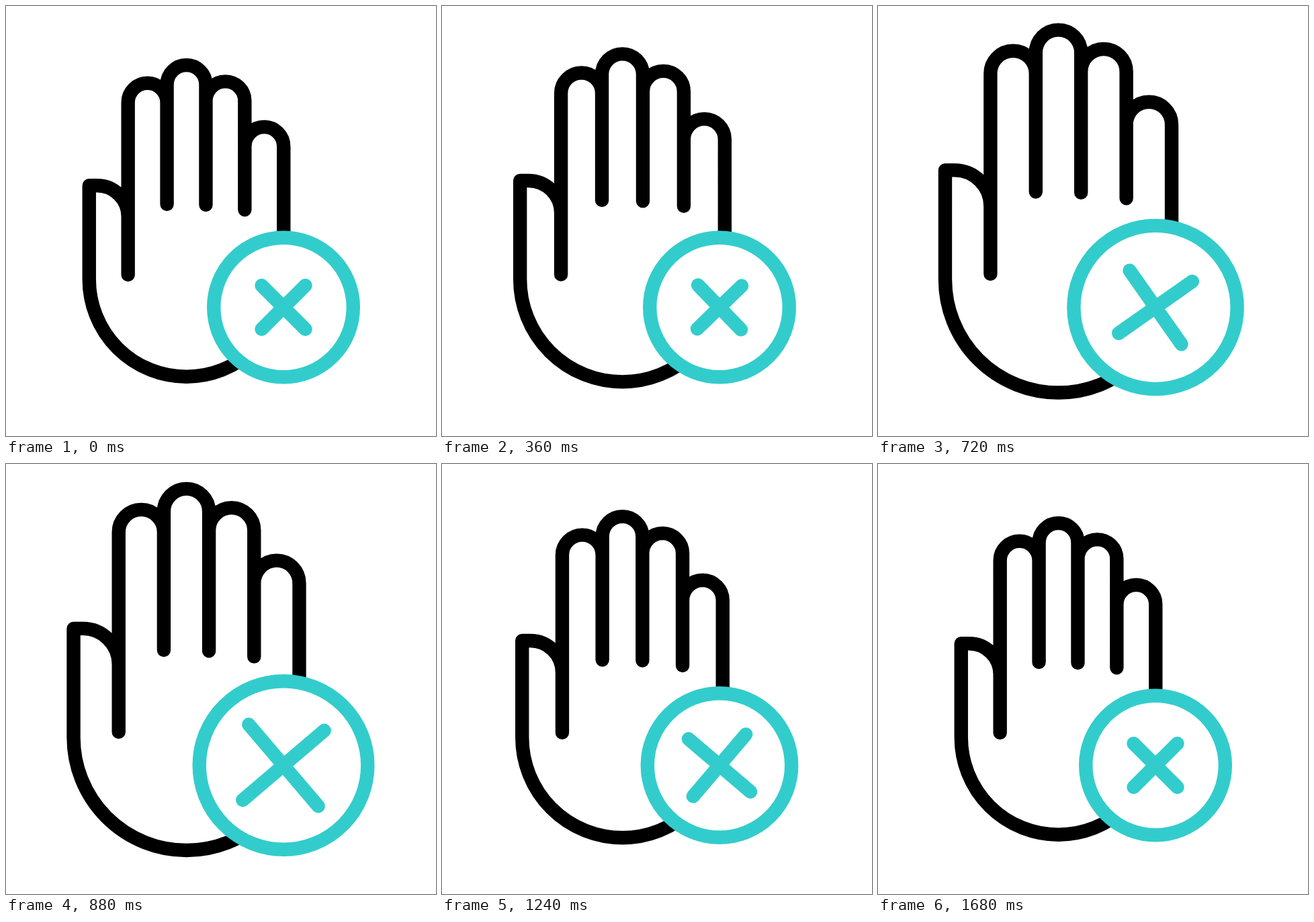
Animation of 640x640 px, one loop 1.88 s. Source, as an HTML page with a canvas:

```html
<!DOCTYPE html>
<html lang="en">
<head>
<meta charset="utf-8">
<title>Hand with cancel badge</title>
<style>
  html, body { margin: 0; width: 100%; height: 100%; overflow: hidden; background: #fff; }
  canvas { display: block; width: 100vmin; height: 100vmin; }
</style>
</head>
<body>
<canvas id="stage" width="640" height="640"></canvas>
<script>
const ctx = document.getElementById('stage').getContext('2d');
const LOOP = 1880, STEP = 40, STROKE = 20.4;
const PALM = { x: 268.5, y: 407 }, BADGE = { x: 413, y: 448.5 };
const GAP = 57.9; // distance between neighbouring finger lines

// Symmetric cubic Bezier easing (k, 0, 1 - k, 1), solved by bisection.
function ease(x, k = 0.45) {
  if (x <= 0) return 0;
  if (x >= 1) return 1;
  let low = 0, high = 1;
  for (let i = 0; i < 24; i++) {
    const t = (low + high) / 2, u = 1 - t;
    const at = 3 * u * u * t * k + 3 * u * t * t * (1 - k) + t * t * t;
    if (at < x) low = t; else high = t;
  }
  return low * low * (3 - 2 * low);
}

// Keys are [time, value] pairs.
function track(keys, time) {
  let value = keys[0][1];
  for (let i = 1; i < keys.length; i++) {
    const [t0, v0] = keys[i - 1], [t1, v1] = keys[i];
    value += (v1 - v0) * ease((time - t0) / (t1 - t0));
  }
  return value;
}

const handScale = [[110, 1], [740, 1.1645], [805, 1.1645], [1435, 1]];
const ringRadius = [[385, 103.8], [860, 125.3], [900, 125.3], [1375, 103.8]];
const armLength = [[428, 46], [953, 81], [1478, 46]];
const crossTurn = [[270, 0], [672, 10], [690, 10], [1140, -5], [1600, 0]];

function stroke(color) {
  ctx.setTransform(1, 0, 0, 1, 0, 0);
  ctx.strokeStyle = color;
  ctx.lineWidth = STROKE;
  ctx.lineCap = ctx.lineJoin = 'round';
  ctx.stroke();
}

// Coordinates are relative to the palm centre.
function finger(column, top, leftEnd, rightEnd) {
  const left = (column - 2.5) * GAP, r = GAP / 2;
  ctx.moveTo(left, leftEnd);
  ctx.lineTo(left, top);
  ctx.arc(left + r, top, r, Math.PI, 0);
  ctx.lineTo(left + GAP, rightEnd);
}

function drawHand(scale) {
  const side = 2.5 * GAP;
  ctx.setTransform(scale, 0, 0, scale, PALM.x, PALM.y);
  ctx.beginPath();
  finger(1, -263.3, -7, -263.3);
  finger(2, -290, -112, -111);
  finger(3, -265.7, -265.7, -103.7);
  finger(4, -198, -198, 0);
  ctx.arc(0, 0, side, 0, Math.PI);
  ctx.lineTo(-side, -139.7);
  ctx.arc(-1.5 * GAP - 46, -93.7, 46, -Math.PI / 2, 0);
  stroke('#000');
}

function drawBadge(radius, arm, degrees) {
  ctx.beginPath();
  ctx.arc(BADGE.x, BADGE.y, radius, 0, 2 * Math.PI);
  ctx.fillStyle = '#fff';
  ctx.fill();
  stroke('#33cccc');

  ctx.translate(BADGE.x, BADGE.y);
  ctx.rotate((45 + degrees) * Math.PI / 180);
  ctx.beginPath();
  ctx.moveTo(-arm, 0);
  ctx.lineTo(arm, 0);
  ctx.moveTo(0, -arm);
  ctx.lineTo(0, arm);
  stroke('#33cccc');
}

function draw(time) {
  ctx.setTransform(1, 0, 0, 1, 0, 0);
  ctx.fillStyle = '#fff';
  ctx.fillRect(0, 0, 640, 640);
  drawHand(track(handScale, time));
  drawBadge(track(ringRadius, time), track(armLength, time), track(crossTurn, time));
}

const start = performance.now();
function tick() {
  const time = (performance.now() - start) % LOOP;
  draw(Math.floor(time / STEP) * STEP);
  requestAnimationFrame(tick);
}
tick();
</script>
</body>
</html>
```
